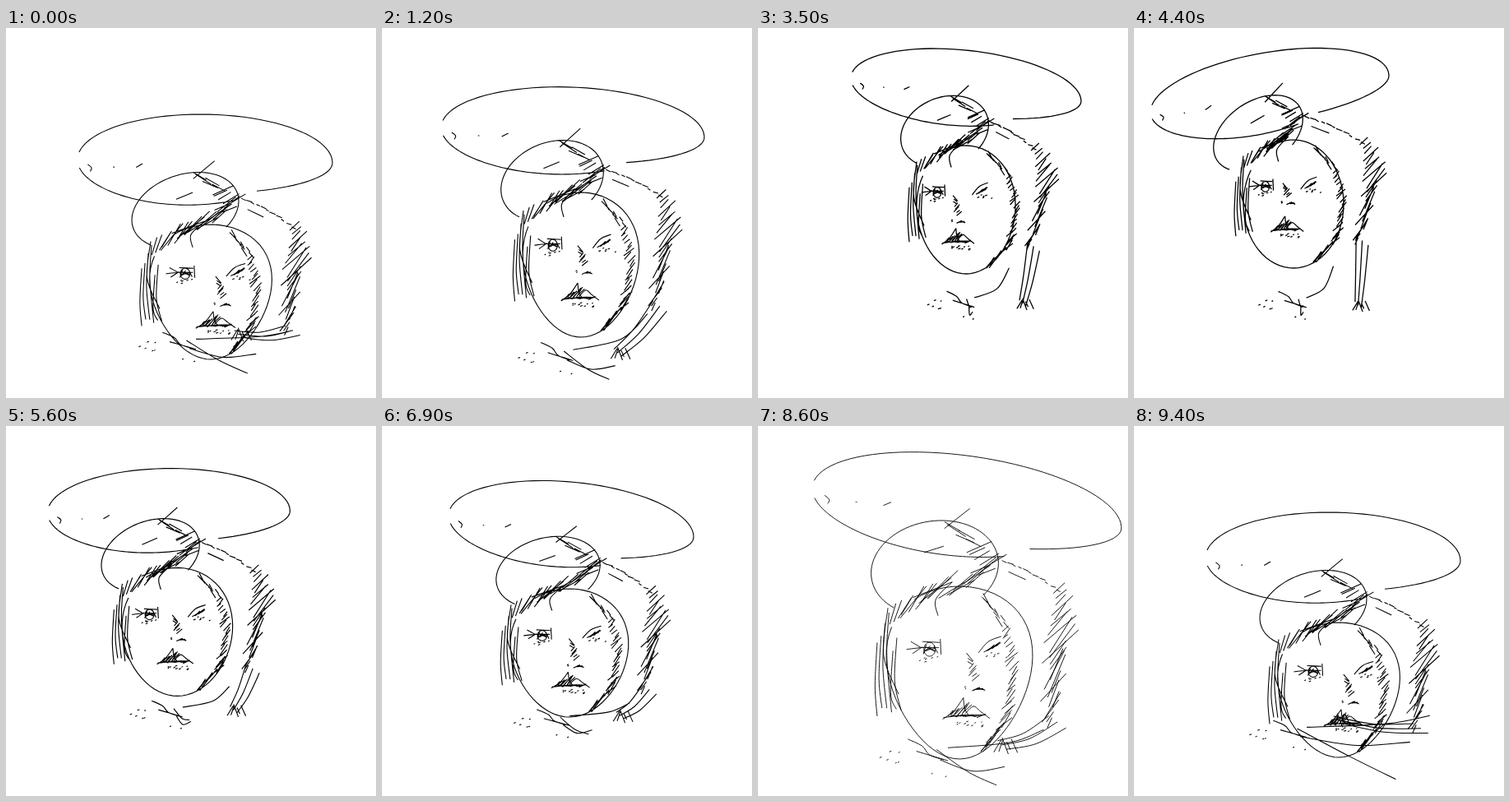
Write an HTML page with a canvas that moves like this. It is 450 by 450 pixels and loops after 9500 ms.

```html
<!DOCTYPE html>
<html lang="en">
<head>
<meta charset="utf-8">
<title>Line portrait</title>
<style>
html, body { margin: 0; width: 100%; height: 100%; overflow: hidden; background: #fff; }
canvas { display: block; width: 450px; height: 450px; }
</style>
</head>
<body>
<canvas id="stage" width="450" height="450"></canvas>
<script>
const ctx = document.getElementById('stage').getContext('2d');
const LOOP = 9500, STEP = 100, PI = Math.PI;

// brim: x, y, rx, ry, slant; face: x, y, rx, ry, taper; crown, knot: x, y; look: turn, nod
const pose = (brim, face, crown, knot, look) => ({ brim, face, crown, knot, look });
const rest = pose([242, 162, 155, 57, 2], [249, 321, 73, 82, 0.2], [218, 222], [285, 373], [0.23, 0]);
const tied = { ...rest, knot: [250, 358] };
const level = pose([232, 127, 160, 55, 6], [242, 288, 70, 88, 0.15], [207, 186], [289, 396], [0.09, -0.04]);
const aside = pose([211, 91, 140, 48, 14], [211, 237, 60, 78, 0.06], [185, 142], [282, 352], [-0.12, 0]);
const raised = pose([165, 80, 145, 51, -22], [194, 214, 61, 78, 0], [151, 128], [275, 338], [-0.07, -0.1]);
const front = pose([230, 122, 149, 54, 13], [228, 276, 71, 78, 0.15], [202, 178], [292, 353], [0.14, 0.01]);
const close = pose([269, 145, 188, 64, 24], [260, 345, 87, 105, 0.22], [230, 218], [315, 434], [0.25, 0]);

// time, pose, shift x, shift y
const keys = [
  [0, rest, 0, 0], [1000, level, 8, 5], [1200, level, 0, 0], [1700, level, -17, -20],
  [2000, level, -4, -15], [2700, aside, 0, 0], [3000, aside, 0, -21], [3500, aside, 42, -16],
  [4000, raised, 42, -5], [4400, raised, 0, 0], [5000, raised, 0, -2], [6000, front, -10, 0],
  [6500, front, 6, 12], [6900, front, 0, 0], [7900, close, 0, 0], [8600, close, -15, -45],
  [9000, tied, 0, -55], [9400, tied, 0, 0]
];

const rand = i => { const v = Math.sin(i * 12.9898 + 4.1) * 43758.5453; return v - Math.floor(v); };
const lerp = (a, b, k) => a + (b - a) * k;
const frame = (x, y, rx, ry, slant = 0) => (u, v) => [x + rx * u, y + ry * v + slant * u];
const moved = (at, x, y) => (u, v) => at(x + u, y + v);

function blend(a, b, k) {
  const out = {};
  for (const part in a) out[part] = a[part].map((v, i) => lerp(v, b[part][i], k));
  return out;
}

// Catmull-Rom curve through u, v pairs
function line(at, ...uv) {
  const p = [];
  for (let i = 0; i < uv.length; i += 2) p.push(at(uv[i], uv[i + 1]));
  ctx.moveTo(...p[0]);
  for (let i = 0; i < p.length - 1; i++) {
    const a = p[i], b = p[i + 1], before = p[i - 1] || a, after = p[i + 2] || b;
    ctx.bezierCurveTo(
      a[0] + (b[0] - before[0]) / 6, a[1] + (b[1] - before[1]) / 6,
      b[0] - (after[0] - a[0]) / 6, b[1] - (after[1] - a[1]) / 6, ...b);
  }
}

// Arc in degrees; shape(cos, sin, progress) returns u, v
function arc(at, from, to, shape = (c, s) => [c, s]) {
  for (let i = 0; i <= 60; i++) {
    const a = lerp(from, to, i / 60) * PI / 180;
    const p = at(...shape(Math.cos(a), Math.sin(a), i / 60));
    i ? ctx.lineTo(...p) : ctx.moveTo(...p);
  }
}

// Strokes strung along path(k); size(k) in pixels, tilt(k) in degrees
function hatch(path, count, seed, size, tilt, spread) {
  for (let i = 0; i < count; i++) {
    const k = i / (count - 1), [x, y] = path(k);
    const len = size(k) * (0.3 + 0.4 * rand(seed + i));
    const a = (tilt(k) + 24 * (rand(seed + i * 3) - 0.5)) * PI / 180;
    const cx = x + spread * (rand(seed + i * 7) - 0.5);
    ctx.moveTo(cx - len * Math.cos(a), y - len * Math.sin(a));
    ctx.lineTo(cx + len * Math.cos(a), y + len * Math.sin(a));
  }
}

function specks(at, count, seed, w, h) {
  for (let i = 0; i < count; i++) {
    const [x, y] = at(w * (rand(seed + i) - 0.5), h * (rand(seed + i * 5) - 0.5));
    ctx.moveTo(x, y);
    ctx.lineTo(x + 1 + rand(i) * 2, y - 1);
  }
}

function drawHat({ brim, face, crown }) {
  const [fx, fy, rx, ry] = face;
  const hat = frame(...brim), cap = frame(...crown, rx * 0.89, ry * 0.55, brim[4] / 4 - 12);
  arc(hat, 189, 426, (c, s) => [c, s > 0 ? s * 0.68 : s]);
  arc(hat, 170, 76, (c, s, k) => [c, s * (1 - 0.15 * k ** 4)]);
  arc(cap, 130, 400);
  line(hat, -0.92, 0.1, -0.89, 0.17, -0.9, 0.25);
  line(hat, -0.54, 0.15, -0.49, 0.07);
  line(hat, -0.72, 0.15, -0.71, 0.15);
  line(cap, 0.15, -0.82, 0.55, -1.2);
  line(cap, -0.17, -0.35, 0.14, -0.45);
  hatch(k => cap(lerp(0.3, 0.85, k), lerp(-0.85, -0.1, k)), 9, 11, () => rx * 0.3, k => k < 0.6 ? 35 : -25, 10);
  hatch(k => cap(lerp(0.95, 0.35, k), lerp(-0.05, 0.5, k)), 12, 29, () => rx * 0.36, () => -32, 14);
}

function drawHair({ brim, face, crown, look }) {
  const [x, y, rx, ry] = face, at = frame(x, y, rx, ry);
  const bulge = 1.55 - 0.6 * look[0];
  // fringe
  hatch(k => at(lerp(-0.9, -0.25, k), lerp(-0.68, -1.02, k)), 11, 53, () => rx * 0.42, k => lerp(-65, -45, k), 8);
  line(at, -0.1, -1.05, -0.33, -0.85, -0.3, -0.66);
  line(at, -0.65, -0.87, -0.1, -1.05);
  // side locks
  for (let i = 0; i < 6; i++) {
    const u = -1.18 + i * 0.055, top = -0.75 + 0.5 * rand(i + 3);
    line(at, u + 0.03, top, u, top + 0.5, u + 0.03 + i * 0.012, 0.35 + 0.2 * rand(i + 9));
  }
  line(at, -1, -0.75, -1.06, -0.2, -0.85, 0.25);
  // long hair
  const fall = k => at(k < 0.3 ? lerp(1.38, bulge, k / 0.3) : lerp(bulge, 1.27, ((k - 0.3) / 0.7) ** 2), lerp(-0.98, 0.58, k));
  hatch(fall, 24, 31, k => rx * (0.2 + 0.32 * Math.sin(PI * k)), k => lerp(-46, -64, k), 9);
  // veil
  const [sx, sy] = [crown[0] + rx * 0.97, crown[1] + brim[4] / 4 - 14], end = at(1.38, -0.95);
  const veil = frame(sx, sy, end[0] - sx, end[1] - sy);
  hatch(k => veil(k, k - 0.12 * Math.sin(PI * k)), 11, 71, () => 6, () => 24, 3);
  line(veil, 0.08, 0.35, 0.4, 0.62);
}

function drawFace({ face, look }) {
  const [x, y, rx, ry, taper] = face, [turn, nod] = look;
  const at = frame(x, y, rx, ry);
  arc(at, 212, -122, (c, s) => [c * (1 - taper * s), s]);
  const shade = k => {
    const a = lerp(-68, 68, k) * PI / 180;
    return at(Math.cos(a) * (0.84 - 0.7 * turn) + 0.08, Math.sin(a) * 0.93);
  };
  hatch(shade, 44, 7, k => rx * (0.11 + 0.13 * k), k => k < 0.25 ? 50 : -48, 7);

  const left = moved(at, -0.53 + 0.45 * turn, -0.27);
  line(left, -0.32, 0, -0.1, -0.02, 0.13, -0.02);
  line(left, -0.26, -0.09, -0.12, -0.02);
  line(left, -0.24, 0.05, -0.1, -0.03);
  line(left, -0.1, -0.09, 0.14, -0.08);
  line(left, 0.15, -0.12, 0.16, 0.06);
  arc(left, 0, 360, (c, s) => [c * 0.08, s * 0.08]);
  hatch(k => left(lerp(-0.07, 0.07, k), 0), 7, 83, () => rx * 0.13, k => lerp(-75, 60, k), 3);
  specks(moved(left, 0, 0.12), 6, 15, 0.3, 0.06);

  const right = moved(at, 0.37 + 0.38 * turn, -0.3);
  line(right, -0.2, 0.07, -0.06, -0.06, 0.12, -0.12);
  hatch(k => right(lerp(-0.06, 0.08, k), lerp(0.03, -0.03, k)), 10, 97, () => rx * 0.13, () => -35, 2);
  specks(moved(right, 0, 0.1), 6, 25, 0.4, 0.06);

  const nose = moved(at, turn, 0.16 + 2 * nod);
  hatch(k => nose(lerp(-0.12, -0.03, k), lerp(-0.34 - nod, -0.1, k)), 8, 41, () => rx * 0.11, k => k < 0.4 ? 40 : -40, 3);
  hatch(k => nose(lerp(-0.03, 0.07, k), 0.03), 6, 61, () => rx * 0.09, k => lerp(-35, 30, k), 2);
  specks(moved(nose, -0.17, 0.02), 2, 35, 0.04, 0.04);

  const mouth = moved(at, -0.08 + 0.7 * turn, 0.44 + nod);
  line(mouth, -0.33, 0.1, -0.17, 0, -0.04, -0.15);
  line(mouth, -0.04, -0.15, -0.02, -0.02, 0.04, 0.06);
  line(mouth, -0.02, 0.04, 0.1, -0.05, 0.2, 0.01, 0.33, 0.09);
  line(mouth, -0.32, 0.08, 0, 0.05, 0.27, 0.05);
  hatch(k => mouth(lerp(-0.22, 0, k), lerp(0.03, -0.02, k)), 10, 19, k => rx * (0.1 + 0.12 * k), () => -52, 2);
  hatch(k => mouth(lerp(-0.2, 0.22, k), 0.06), 10, 43, () => rx * 0.1, () => -12, 2);
  specks(moved(mouth, 0, 0.16), 11, 55, 0.44, 0.06);
}

function drawCollar({ face, knot }) {
  const [x, y, rx, ry] = face, at = frame(x, y, rx, ry);
  const ku = (knot[0] - x) / rx, kv = (knot[1] - y) / ry;
  const bu = -0.9 + 0.6 * ku, bv = 1 + 0.8 * (kv - 0.86);
  const bib = moved(at, bu, bv), slack = ku - 0.5, tail = Math.max(0, 1.2 - ku);
  // strands from the knot to the tip of the hair
  for (let i = 0; i < 3; i++) {
    const u = 1.25 + i * 0.12, v = 0.5 + i * 0.07, sx = ku - 0.1 + i * 0.06, sy = kv - 0.06 + i * 0.05;
    line(at, sx, sy, (sx + u) / 2, (sy + v) / 2 + 0.06, u, v);
  }
  hatch(k => at(ku + lerp(-0.1, 0.12, k), kv), 5, 67, () => rx * 0.2, k => k < 0.5 ? -60 : 75, 3);
  // neckline
  const eu = 1.25 - 0.55 * slack, ev = 0.6 + 0.45 * slack;
  line(at, bu + 0.36, bv - 0.12, lerp(bu + 0.36, eu, 0.65), lerp(bv - 0.12, ev, 0.3), eu, ev);
  line(bib, 0.25, 0.02, 0.25 + tail * 0.8, 0.15, 0.3 + tail * 1.5, 0.1);
  line(bib, 0.2, -0.1, 0.25 + tail * 0.7, 0.02 + tail * 0.25, 0.3 + tail * 1.3, tail * 0.55);
  line(bib, -0.2, -0.22, 0, -0.14, 0.1, -0.04, 0.3, 0.02);
  line(bib, -0.08, -0.08, 0.12, -0.03, 0.36, 0.03);
  specks(moved(bib, -0.48, -0.04), 6, 77, 0.3, 0.2);
  specks(moved(bib, 0.25, 0.2), 2, 87, 0.4, 0.1);
}

function draw(t) {
  const i = Math.max(1, keys.findIndex(key => key[0] >= t));
  const [t0, from, x0, y0] = keys[i - 1], [t1, to, x1, y1] = keys[i];
  const k = (t - t0) / (t1 - t0), now = blend(from, to, k);
  ctx.setTransform(1, 0, 0, 1, 0, 0);
  ctx.fillStyle = '#fff';
  ctx.fillRect(0, 0, 450, 450);
  ctx.translate(lerp(x0, x1, k), lerp(y0, y1, k));
  ctx.strokeStyle = '#000';
  ctx.lineWidth = 78 / now.face[2];
  ctx.beginPath();
  drawHat(now);
  drawFace(now);
  drawHair(now);
  drawCollar(now);
  ctx.stroke();
}

const start = performance.now();
function tick() {
  const t = (performance.now() - start) % LOOP;
  draw(Math.floor(t / STEP) * STEP);
  requestAnimationFrame(tick);
}
tick();
</script>
</body>
</html>
```
